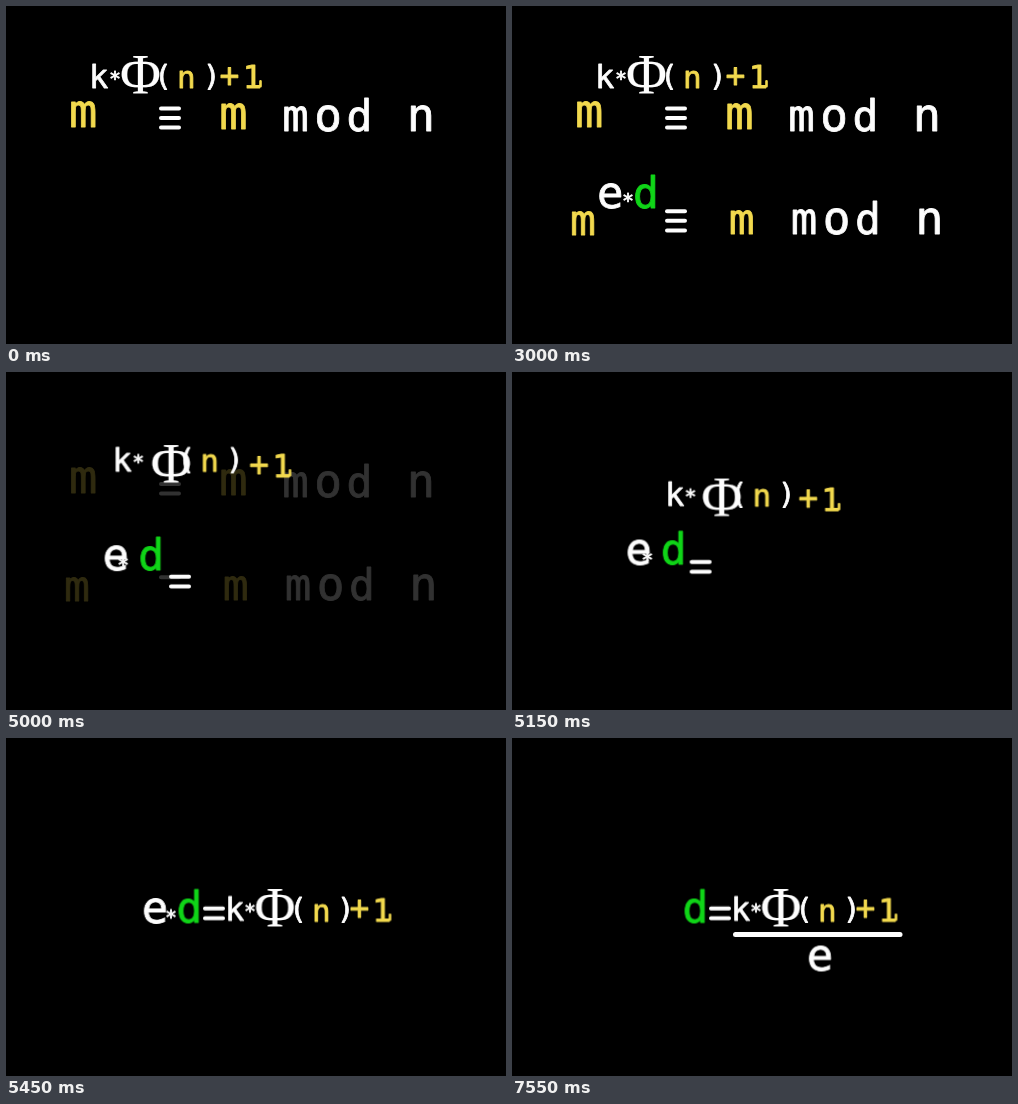
These frames come from a looping animation (500 px wide and 338 px high, 8000 ms). An HTML page:

```html
<!DOCTYPE html>
<html lang="en">
<head>
<meta charset="utf-8">
<title>Deriving the private exponent</title>
<style>
  html, body { margin: 0; width: 100%; height: 100%; overflow: hidden; background: #000; }
  svg { display: block; width: 100%; height: 100%; }
  text {
    font-family: "DejaVu Sans Mono", monospace;
    text-anchor: middle;
    fill: currentColor;
    stroke: currentColor;
    stroke-width: .8;
    stroke-linejoin: round;
  }
  .serif { font-family: "Liberation Serif", serif; stroke-width: .2; }
  path { fill: none; stroke: currentColor; stroke-linecap: round; stroke-linejoin: round; }
</style>
</head>
<body>
<svg id="stage" viewBox="0 0 500 338"></svg>
<script>
const LOOP = 8000;
const WHITE = '#fdfdfd', YELLOW = '#f2d94e', GREEN = '#10d518';
const SMOOTH = 'cubic-bezier(.3333, 0, .6667, 1)';
const stage = document.getElementById('stage');

function add(tag, attrs, parent = stage) {
  const el = document.createElementNS('http://www.w3.org/2000/svg', tag);
  for (const name in attrs) el.setAttribute(name, attrs[name]);
  parent.append(el);
  return el;
}

function glyph(char, x, y, size, color, parent = stage) {
  const group = add('g', { color }, parent);
  add('text', { x, y, 'font-size': size }, group).textContent = char;
  return group;
}

function bars(x, ys, parent = stage) {
  const d = ys.map(y => `M${x - 9} ${y}h18`).join('');
  return add('path', { d, color: WHITE, 'stroke-width': 4 }, parent);
}

// steps: [time, value] pairs; the first and last values are held to the loop ends
function play(el, prop, steps, easing) {
  const all = [[0, steps[0][1]], ...steps, [LOOP, steps.at(-1)[1]]];
  const frames = all.map(([time, value]) => ({ offset: time / LOOP, [prop]: value, easing }));
  el.animate(frames, { duration: LOOP, iterations: Infinity });
}

const fade = (el, ...steps) => play(el, 'opacity', steps, 'linear');
const move = (el, ...steps) => play(el, 'transform',
  steps.map(([time, x, y]) => [time, `translate(${x}px, ${y}px)`]), SMOOTH);
const slide = (el, x, y, start = 4800) => move(el, [start, 0, 0], [5450, x, y]);

// Both congruences share these parts, which dissolve before the exponents move
const upper = add('g', {});
const lower = add('g', {});
fade(upper, [4800, 1], [5050, 0]);
fade(lower, [40, 0], [250, 1], [4800, 1], [5050, 0]);

function modN(x, y, parent) {
  glyph('m', x, y, 44, WHITE, parent);
  glyph('o', x + 32.5, y, 46, WHITE, parent);
  glyph('d', x + 64, y, 43, WHITE, parent);
  glyph('n', x + 125.5, y, 47, WHITE, parent);
}

glyph('m', 77.2, 121, 47, YELLOW, upper);
bars(164, [102.5, 112, 121.5], upper);
glyph('m', 227.5, 122.5, 47, YELLOW, upper);
modN(289.5, 125, upper);

glyph('m', 71, 228.5, 43, YELLOW, lower);
bars(164, [205.3], lower);
glyph('m', 229.8, 227.5, 43, YELLOW, lower);
modN(292, 227.5, lower);

// k * Φ(n) + 1
const LATE = 4840;
const phi = glyph('Φ', 134.5, 87.5, 56, WHITE);
phi.firstChild.setAttribute('class', 'serif');
slide(phi, 134.5, 101);
slide(glyph('k', 92.7, 82, 32, WHITE), 136, 100.5, LATE);
slide(glyph('*', 109, 79, 20, WHITE), 135, 100.5, LATE);
slide(glyph('(', 157, 80, 29, WHITE), 135, 101, LATE);
slide(glyph('n', 180.3, 82, 31, YELLOW), 135, 101.5, LATE);
slide(glyph(')', 205.8, 80, 29, WHITE), 134, 101, LATE);
slide(glyph('+', 223.5, 80.5, 33, YELLOW), 130, 100.5);
const one = glyph('1', 246.5, 81.5, 32, YELLOW);
add('path', { d: 'M249 80.2h5.5v-5', 'stroke-width': 2.6 }, one);
slide(one, 129.5, 101.5);

// e * d =
const exponent = add('g', {});
fade(exponent, [40, 0], [250, 1]);

slide(bars(164, [214.8, 224.5], exponent), 44, -44.3);
slide(glyph('d', 134, 202, 43, GREEN, exponent), 49.5, -17.5);

const star = glyph('*', 116, 200.5, 20, WHITE, exponent);
move(star, [3700, 0, 0], [3700, -3.5, -.5], [4900, -3.5, -.5], [5450, 49, -15.5]);
fade(star, [6400, 1], [6750, 0]);

const e = glyph('e', 98.3, 202, 44, WHITE, exponent);
move(e, [4800, 0, 0], [5450, 50.7, -17], [6880, 50.7, -17], [7540, 209.7, 30.5]);

const fraction = add('path', { d: 'M223.5 196.5H388', color: WHITE, 'stroke-width': 5 });
fade(fraction, [7230, 0], [7480, 1]);
</script>
</body>
</html>
```
